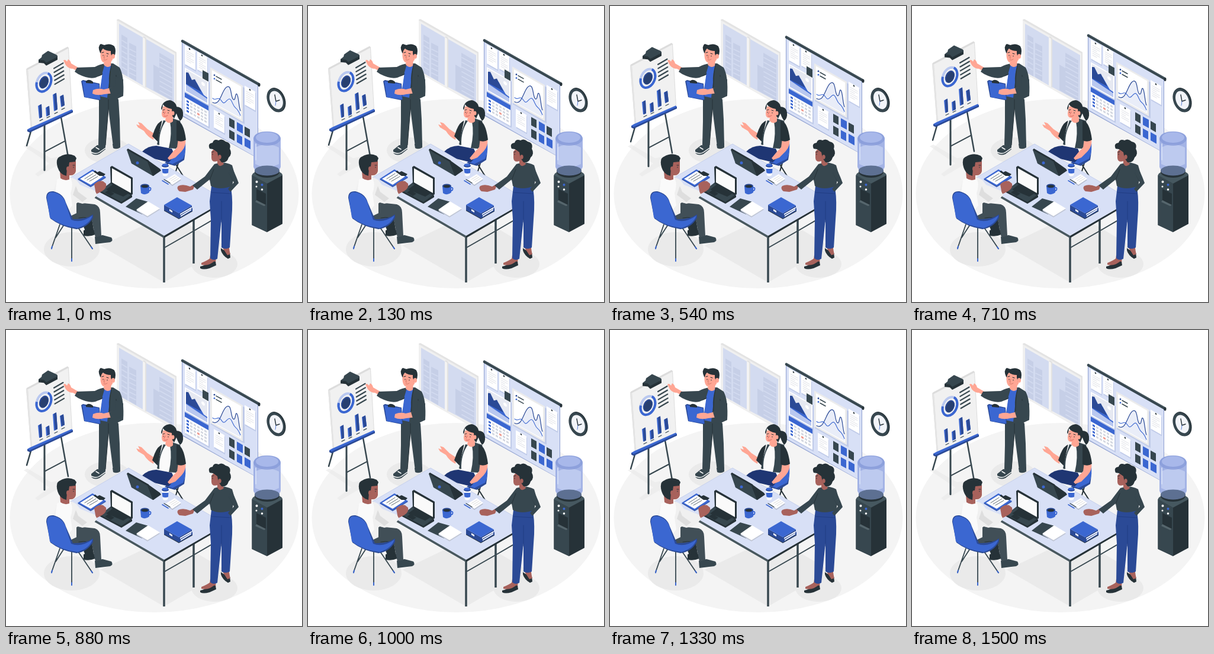
An HTML page for the animation above (1540 ms loop, 500 by 500 pixels).

```html
<!DOCTYPE html>
<html lang="en">
<head>
<meta charset="utf-8">
<title>Team meeting</title>
<style>
html,body{margin:0;width:100%;height:100%;overflow:hidden;background:#fff}
svg{display:block;width:100%;height:100%}
.k{fill:#37474f}.d{fill:#263238}.b{fill:#3b67d1}.n{fill:#2b4a96}.l{fill:#d8e0f6}
.w{fill:#fff}.p{fill:#fafafa}.s{fill:#ffa694}.r{fill:#a8625c}
.ln{fill:none;stroke-linecap:round;stroke-linejoin:round}
.sk{stroke:#37474f}.sd{stroke:#263238}.sb{stroke:#3b67d1}.sn{stroke:#2b4a96}.sg{stroke:#d2d2d2}
</style>
</head>
<body>
<svg viewBox="0 0 500 500">
  <ellipse cx="250.5" cy="317" rx="244" ry="160" fill="#f4f4f4"/>
  <g fill="#eaeaea">
    <ellipse cx="171" cy="244" rx="38" ry="22"/>
    <ellipse cx="111" cy="411" rx="47" ry="29"/>
    <ellipse cx="352" cy="436" rx="39" ry="23"/>
    <path d="M160 405 267 467 372 406 275 350Z"/>
    <path d="M30 237 36 234 76 257 104 252 109 256 54 288 49 284 73 266Z" opacity=".65"/>
  </g>

  <!-- window -->
  <path fill="#e3e3e3" d="M187 23 190 22 288 78V167L285 168 187 112Z"/>
  <path fill="#f0f0f0" d="M187 24 286 80V168L187 112Z"/>
  <path fill="#d3dbf0" d="M191 30 231 53V134L191 111ZM237 56 284 83V162L237 137Z"/>
  <path fill="#c6cfe7" d="M195 48 205 54V119L195 113ZM208 62 220 68V127L208 120ZM259 79 281 92V160L259 148ZM249 99 259 105V148L249 142Z"/>
  <path id="panes" class="ln" stroke="#d3dbf0" stroke-width="1.6"/>
  <path fill="#e2e2e2" d="M231 53 233 51 237 54V138L231 135Z"/>
  <path fill="#f3f3f3" d="M231 53 235 55V137L231 135Z"/>

  <!-- wall board -->
  <g class="float">
    <path fill="#8e9fd0" d="M297 60 426 133V258L297 186Z"/>
    <g transform="matrix(1 .567 0 1 298 60)">
      <rect class="l" y="1" width="127" height="124"/>
      <g fill="#bfcae8">
        <rect x="5" y="6" width="18" height="32"/><rect x="26" y="5" width="17" height="30"/>
        <rect x="5" y="43" width="41" height="78"/><rect x="48" y="19" width="57" height="61"/>
        <rect x="106" y="17" width="18" height="32"/><rect x="54" y="87" width="18" height="30"/>
      </g>
      <g class="w">
        <rect x="4" y="4" width="18" height="32"/><rect x="25" y="3" width="17" height="30"/>
        <rect x="4" y="42" width="40" height="40"/><rect x="4" y="84" width="40" height="35"/>
        <rect x="105" y="15" width="18" height="32"/><rect x="53" y="85" width="18" height="30"/>
      </g>
      <rect x="47" y="17" width="55" height="61" fill="#ececec"/>
      <rect class="w" x="50" y="20" width="49" height="55"/>
      <g id="notes" class="ln" stroke="#d6d9e0" stroke-width=".7"></g>
      <g class="d"><circle cx="12" cy="6" r="1.3"/><circle cx="33" cy="5" r="1.3"/><circle cx="114" cy="17" r="1.3"/><circle cx="62" cy="87" r="1.3"/></g>
      <rect class="k" x="34" y="29" width="10" height="14"/>
      <rect fill="#e6e9f2" x="6" y="44" width="36" height="36"/>
      <path class="b" d="M6 66 17 58 24 56 36 70 42 71V74L6 72Z"/>
      <path class="n" d="M6 68V49L10 47 16 56 21 52 32 67Z"/>
      <path fill="#b9c8f0" d="M6 69 42 73V80H6Z"/><circle class="w" cx="35" cy="52" r="3"/>
      <rect class="b" x="4" y="84" width="40" height="8"/>
      <g id="days"></g>
      <g class="k"><rect x="79" y="84" width="9" height="14"/><rect x="105" y="84" width="9" height="14"/><rect x="79" y="104" width="9" height="14"/></g>
      <g class="b"><rect x="92" y="84" width="10" height="14"/><rect x="92" y="104" width="9" height="14"/><rect x="105" y="103" width="10" height="14"/></g>
    </g>
    <path fill="#e9edf8" d="M349 163C357 168 361 158 365 149S373 134 377 137 380 155 384 158 387 146 390 149 393 170 396 177V189L349 163Z"/>
    <g class="ln">
      <path class="sn" stroke-width="1.2" d="M349 163C357 168 361 158 365 149S373 134 377 137 380 155 384 158 387 146 390 149 393 170 396 177"/>
      <path class="sb" stroke-width="1.1" d="M349 156C354 161 357 154 361 157S366 167 371 162 378 153 383 165 389 168 396 185"/>
      <path class="sk" stroke-width="1.5" d="M355 119 364 124M355 125 364 130"/>
    </g>
    <circle class="n" cx="352" cy="117" r="1.4"/><circle class="b" cx="352" cy="123" r="1.4"/>
    <path class="ln sk" stroke-width="4.6" d="M298 59.500 427 132.500"/>
    <path class="ln" stroke="#52636b" stroke-width=".8" d="M298 57.800 427 130.800"/>
    <ellipse class="d" cx="427.500" cy="133.500" rx="2" ry="3"/>
  </g>

  <!-- clock -->
  <g transform="rotate(-22 456 159)">
    <ellipse class="d" cx="457" cy="159" rx="14.5" ry="21.5"/>
    <ellipse class="k" cx="455.500" cy="159" rx="14" ry="21"/>
    <ellipse cx="456.500" cy="159" rx="10.500" ry="16" fill="#f2f4f9"/>
  </g>
  <path class="ln sd" stroke-width="1.4" d="M454 150 456 161 462 159"/>
  <path class="ln sb" stroke-width=".8" d="M456 161 455 168"/>

  <!-- flip chart -->
  <g class="float">
    <g class="ln sk">
      <path stroke-width="2.5" d="M42 212 35 236M93 188 105 255"/>
      <path stroke-width="2" d="M66 246 100 228"/>
      <path stroke-width="3" d="M65 200V277.500"/>
    </g>
    <path fill="#dcdcdc" d="M34 107 36 105 104 69 106 71 112 176 42 209Z"/>
    <path fill="#f1f1f1" d="M37 108 105 72 111 175 44 207Z"/>
    <path fill="#e4e4e4" d="M34 107 37 108 44 207 42 208Z"/>
    <path class="d" d="M55 91 87 84V91L68 101 64 97 55 96Z"/>
    <path class="k" d="M55 91 60 87 61 83 71 76 86 83 87 86 68 96 64 92Z"/>
    <g transform="rotate(24 64 129)">
      <ellipse cx="64" cy="129" rx="11.500" ry="16.500" fill="none" stroke="#b9c8f0" stroke-width="4"/>
      <path class="ln sb" stroke-width="4" style="stroke-linecap:butt" d="M64 112.500A11.500 16.500 0 1 1 53 134"/>
      <ellipse class="n" cx="64" cy="129" rx="7.500" ry="11"/>
      <ellipse class="d" cx="64.500" cy="129.500" rx="6" ry="9.500" opacity=".4"/>
    </g>
    <path id="bullets" class="ln sk" stroke-width="2.200"/>
    <path class="b" d="M54 169 60 166 61 188 56 190ZM67 172 73 169 74 184 68 187ZM79 150 85 147 87 175 81 178ZM91 153 97 150 99 168 93 171Z"/>
    <path class="n" d="M56 168 60 166 61 188 57 190ZM69 171 73 169 74 184 70 186ZM81 149 85 147 87 175 83 177ZM92 152.500 97 150 99 168 94 170.500Z"/>
    <path class="ln sk" stroke-width="1.200" d="M57 194 62 191.500M69 189 74 186.500M82 182 87 179.500M94 175 99 172.500"/>
    <path class="n" d="M36 209 111 176 113 177V180L40 214 36 212Z"/>
    <path class="b" d="M36 209 41 206 111 175 113 177 40 211Z"/>
  </g>

  <!-- presenter -->
  <path class="k" d="M144 243 154 235 168 236 168 242 158 250Q149 254 144 248ZM180 233 193 232 193 239Q187 243 181 240Z"/>
  <path class="ln" stroke="#fff" stroke-width="1.500" d="M144 247Q152 251 158 247L168 240M152 239 157 242"/>
  <path class="k" d="M157 148 183 148 190 158 192 192 193 235Q188 240 181 237L175 190 173 174 168 236Q162 239 156 235L157 195Z"/>
  <path class="ln sd" stroke-width="1" d="M173 158V174L168 235"/>
  <path class="s" d="M119 109 113 106Q106 106 101 100L97 92Q100 89 103 94L105 90Q109 92 110 97L122 104Z"/>
  <path class="k" d="M169 97Q159 98 150 103L120 104 116 111 122 115Q140 124 151 121L163 116 158 152 185 158 198 152Q200 119 192 104L181 97Z"/>
  <path class="b" d="M167 98 178 99Q173 115 174 129L171 155 157 152Q161 128 163 112Z"/>
  <path class="s" d="M166 93 178 92 177 101Q171 106 165 99Z"/>
  <path class="ln sd" stroke-width="1" d="M178 100Q174 119 175 145M163 115 157 118M186 117 187 137"/>
  <path class="n" d="M127 127 130 125 158 131 160 158 157 159 132 154Z"/>
  <path class="b" d="M129 127 157 132 159 158 133 154Z"/>
  <path class="d" d="M135 127Q140 122 147 128L147 131 135 130Z"/>
  <path class="s" d="M182 137 165 141Q156 138 147 142L146 148Q154 152 166 149L184 147Z"/>
  <path class="k" d="M185 119 198 124 198 143Q190 150 177 149L174 139 184 135Z"/>
  <path class="s" d="M160 74Q168 69 181 76L180 91Q174 99 164 95 158 91 160 74Z"/>
  <path class="d" d="M159 79Q154 68 160 64L166 66Q176 62 183 68 187 75 183 86L179 88 177 80 177 76Q169 76 164 72 161 74 160 80Z"/>
  <ellipse class="s" cx="181" cy="85" rx="3" ry="4"/>
  <path class="ln sd" stroke-width="1.100" d="M162 79 165 78M170 80 173 81M164 83V84M171 84V85"/>
  <path class="ln" stroke="#d57969" stroke-width="1" d="M167 83 165 88 167 88M165 91Q169 92 171 90"/>

  <!-- seated woman -->
  <path class="ln sd" stroke-width="2" d="M284 263 299 287M292 262 287 279M274 265 265 276"/>
  <path class="n" d="M268 265 285 270 301 260Q304 245 302 224L292 215 288 249Z"/>
  <path class="b" d="M302 223Q306 245 299 258L281 267 270 263 289 247 292 218Z"/>
  <path class="s" d="M249 226Q239 221 233 211L223 205 220 200 226 202 223 196 229 198 239 208 251 216Z"/>
  <path class="d" d="M265 193Q256 196 251 209L247 220 256 229 264 222Z"/>
  <path class="p" d="M264 192 285 192 288 240Q270 247 256 237L259 215Z"/>
  <path class="k" d="M282 190 294 194 301 224 287 241 275 240Q281 215 277 195ZM266 193 270 194Q258 211 259 235L255 234 259 214Z"/>
  <path fill="#1f3673" d="M230 246Q240 236 254 236L280 241Q287 253 275 264L250 258Z"/>
  <path class="s" d="M291 224 303 224Q305 236 297 245L286 256 276 260 273 257 282 246 289 239Z"/>
  <path class="d" d="M288 194Q300 194 304 226 297 231 288 227Z"/>
  <path class="d" d="M285 170Q298 169 299 180 300 190 294 194 289 187 287 178Z"/>
  <path class="s" d="M265 170 282 167 286 182 282 187 282 195Q275 201 269 193L270 189Q263 190 263 181Z"/>
  <path class="d" d="M262 173Q264 160 277 159 290 162 289 179L284 190 281 186 280 174Q269 172 265 166 265 171 263 176Z"/>
  <ellipse class="s" cx="282" cy="181" rx="2.500" ry="3.500"/>
  <path class="ln sd" stroke-width="1" d="M265 176 268 175M273 176 276 177M266 179V180M274 180V181"/>
  <path class="ln" stroke="#d46560" stroke-width="1" d="M269 179 267 183M267 186Q271 187 273 185"/>

  <!-- table -->
  <g class="ln sk" style="stroke-linecap:butt">
    <path stroke-width="2" d="M268 408 317 380 346 363M317 380 367 351"/>
    <path stroke-width="3.500" d="M317 360V435M367 333V405"/>
    <path stroke-width="3.500" d="M267 389V467"/>
  </g>
  <path class="d" d="M103 293 267 388 371 328V331L267 392 103 297Z"/>
  <path fill="#495960" d="M103 293 267 388V392L103 297Z"/>
  <path class="l" d="M103 293 207 233 371 328 267 388Z"/>
  <path class="ln" stroke="#c6d0ec" stroke-width="1" d="M103 293 207 233 371 328"/>

  <!-- back laptop -->
  <path class="d" d="M211 264 239 281 249 287 262 278 260 275 239 260Z"/>
  <path class="k" d="M204 243 206 241 241 261 250 286 248 287 212 266Z"/>
  <path class="d" d="M204 243 239 263 248 287 250 286 241 261 206 241Z"/>
  <circle class="b" cx="222" cy="265" r="2.500"/>

  <!-- clipboard -->
  <path class="n" d="M121 293 146 277 169 290 143 306Z"/>
  <path class="b" d="M121 292 146 276 169 289 143 305Z"/>
  <path class="w" d="M125 292 146 279 164 288 143 302Z"/>
  <path class="ln sk" stroke-width=".8" d="M133 292 147 283M137 294 152 285M141 296 155 288"/>
  <path class="d" d="M148 280 151 278 154 281 158 279 168 284 165 287 158 287Z"/>

  <!-- front laptop -->
  <path class="d" d="M159 313 177 299 213 320V323L195 334 159 315Z"/>
  <path class="k" d="M159 312 177 298 213 318 195 331Z"/>
  <path class="d" d="M169 310 181 301 208 316 198 322ZM167 315 173 311 183 317 177 321Z"/>
  <path class="d" d="M176 272 179 270 214 290V318L211 320 177 300Z"/>
  <path class="p" d="M179 274 211 292V316L179 298Z"/>

  <!-- coffee, pad, mug -->
  <path class="w" d="M263 270 275 270 273 286Q269 289 265 286Z"/>
  <path class="b" d="M263.500 275H274.500L274 282Q269 284 264.500 282Z"/>
  <ellipse class="n" cx="269" cy="270" rx="6" ry="2.800"/><ellipse class="b" cx="269" cy="268.500" rx="5" ry="2.300"/>
  <path fill="#b8bfd0" d="M270 295 285 286 296 294 281 304Z"/>
  <path class="w" d="M270 293 285 284 296 292 281 302Z"/>
  <path class="ln sg" stroke-width=".8" d="M276 293 286 287M279 295 289 289M282 297 292 291"/>
  <path class="ln sb" stroke-width="1.600" d="M264 295 274 301"/><path class="ln sk" stroke-width="1.200" d="M267 293 277 299"/>
  <path class="ln sb" stroke-width="2" d="M241 307Q246 306 244 311L240 313"/>
  <path class="b" d="M227 304H242V315Q235 321 228 316Z"/>
  <ellipse class="n" cx="234.500" cy="304" rx="7.500" ry="3.500"/><ellipse class="d" cx="234.500" cy="304.500" rx="5.500" ry="2.300"/>

  <!-- folder and books -->
  <path class="k" d="M202 339 220 325 241 331 230 352Z"/>
  <path fill="#c0c6d5" d="M220 346 240 332 260 344 239 357Z"/>
  <path class="w" d="M220 344 240 330 260 342 239 355Z"/>
  <path class="d" d="M267 346 292 360 315 347V344L292 356 267 342Z"/>
  <path class="n" d="M267 340 292 354 315 341V346L292 359 267 345Z"/>
  <path class="w" d="M295 354 313 343V345L295 356Z"/>
  <path class="n" d="M267 336 292 350 314 337V340L292 355 267 341Z"/>
  <path class="b" d="M267 336 289 323 314 337 292 350Z"/>
  <path class="w" d="M294 351 313 340V342L294 353ZM276 343 281 346V349L276 346Z"/>

  <!-- seated man -->
  <path class="d" d="M131 379 145 374 151 381V386Q142 390 131 388Z"/>
  <path class="k" d="M150 390 163 387 178 391Q182 396 176 399L151 402Z"/>
  <path class="d" d="M120 344 143 348 148 377 134 380 125 358Z"/>
  <path class="r" d="M149 301Q157 294 164 296L169 300Q171 308 162 313L152 318Z"/>
  <path fill="#414f57" d="M105 344 121 332 150 335Q159 338 159 349L161 388 151 391 145 362Q128 371 109 370Z"/>
  <path class="ln sd" stroke-width="1" d="M145 362Q140 355 123 358"/>
  <path fill="#f0f0f0" d="M86 293Q104 284 119 294L125 302 150 312 154 319Q145 332 129 334L119 331 119 350 100 359 78 321Z"/>
  <path class="p" d="M86 293Q98 287 108 290 115 299 109 316L112 337 101 350 82 326Z"/>
  <path fill="#dedede" d="M118 304 122 314 137 325 129 331 113 319Z"/>
  <path class="r" d="M91 278 104 262 118 262 118 279Q116 287 107 286L107 293Q99 296 92 291Z"/>
  <path class="d" d="M87 272Q83 257 92 254 104 247 116 253L119 257 117 263 107 264 106 271 103 275 102 287Q91 285 87 272Z"/>
  <ellipse class="r" cx="105" cy="275" rx="3" ry="4"/>
  <path class="ln sd" stroke-width="1" d="M113 269H116M114 272V273"/>
  <g class="ln sk" stroke-width="1.800"><path d="M91 369 77 409M111 373V430M121 373 146 410M97 371 84 391"/></g>
  <path class="ln sb" stroke-width="2" d="M78 406 77 410M111 427V431M144 407 146 410"/>
  <path class="n" d="M68 324Q68 312 80 313 97 317 101 332L113 360Q134 361 147 352V358Q137 375 119 377 93 373 75 359Z"/>
  <path class="b" d="M69 324Q70 312 82 315 98 319 102 337L110 361Q126 368 146 354 141 369 121 375 91 371 74 357Z"/>

  <!-- water cooler -->
  <path class="d" d="M415.500 286 441 275 467 286V368L441 382 415.500 370Z"/>
  <path class="k" d="M415.500 286 441 300V382L415.500 370Z"/>
  <path fill="#465860" d="M415.500 286Q416 283 420 281L441 272 463 281Q467 283 467 286L441 300Z"/>
  <path class="d" d="M423 309 439 317V337L423 328Z"/>
  <path fill="#56666d" d="M423 328 439 336 436 338 421 331Z"/>
  <circle class="w" cx="423.500" cy="297" r="2"/><circle class="b" cx="432.500" cy="302" r="2"/>
  <circle class="w" cx="423" cy="305" r="1.500"/><circle class="w" cx="432.500" cy="310" r="1.800"/>
  <ellipse class="d" cx="441" cy="280" rx="21" ry="10"/>
  <path fill="#9daee4" fill-opacity=".92" d="M418 224Q420 212 441 212T464 224V272Q458 286 441 286T418 272Z"/>
  <path fill="#c5d0f2" fill-opacity=".8" d="M421 239Q441 229 461 239V267Q441 277 421 267Z"/>
  <ellipse cx="441" cy="224" rx="23" ry="12" fill="#8297d8" fill-opacity=".65"/>
  <ellipse cx="441" cy="222" rx="19" ry="9" fill="#a8b8ea"/>
  <ellipse cx="441" cy="278" rx="21" ry="8.500" fill="#5d7092"/>
  <path class="ln" stroke="#dce4fa" stroke-width="1.500" d="M422 233V260"/>

  <!-- standing woman -->
  <path class="r" d="M345 421 355 422 354 435 343 435ZM365 402 376 402 378 416 370 419Z"/>
  <path class="d" d="M328 440Q338 438 345 430L354 432 355 438 344 443Q333 446 328 443ZM363 409 369 413 378 416 379 425 375 427Q366 422 363 413Z"/>
  <path class="r" d="M330 434Q340 430 345 426L353 430Q343 440 330 437ZM365 407 374 405 379 419 374 421Z"/>
  <path class="n" d="M347 304 379 304Q383 318 382 345L378 408Q371 412 364 408L364 360 357 427Q350 431 345 426L346 360 344 330Z"/>
  <path class="ln" stroke="#213d83" stroke-width="1" d="M364 330V365M347 315 380 317"/>
  <path class="r" d="M320 300 311 305Q299 300 291 304 287 308 293 313L303 314 316 310Z"/>
  <path class="k" d="M352 267Q368 261 382 269L386 283 382 304Q361 312 346 304L344 293 323 310 315 303 336 288Z"/>
  <path class="ln sd" stroke-width="1" d="M351 276 344 294M377 282 384 296"/>
  <path class="k" d="M380 270Q386 280 393 299L379 314 375 309 385 298 376 282Z"/>
  <path class="r" d="M347 246 355 237 367 248 365 261 368 267Q361 274 357 266L357 262Q348 265 347 257Z"/>
  <path class="d" d="M344 241Q340 232 349 231 351 224 359 227 365 223 371 229 381 231 378 241 383 250 376 256 373 266 364 264L359 257 357 247 350 242Z"/>
  <ellipse class="r" cx="361" cy="255" rx="2.700" ry="3.700"/>
  <path class="ln sd" stroke-width="1" d="M348 247 351 246M349 250V251"/>
</svg>
<script>
const $ = id => document.getElementById(id);
const range = (n, f) => Array.from({length: n}, (_, i) => f(i)).join('');

$('panes').setAttribute('d',
  range(8, i => `M260 ${87 + i * 8}l20 11`) + range(6, i => `M196 ${58 + i * 9}l8 5M209 ${73 + i * 8}l10 5`));
$('bullets').setAttribute('d', range(5, i => `M${81 + i * .4} ${105.5 + i * 6.7}l15.5 -9`));

const sheet = (x, y, w, rows) =>
  `<path d="${range(rows, i => `M${x} ${y + i * 3.3}h${i % 3 == 2 ? w * .6 : w}`)}"/>`;
$('notes').innerHTML = sheet(7, 12, 12, 6) + sheet(28, 11, 11, 6) + sheet(108, 23, 12, 6) + sheet(56, 93, 12, 5);
$('days').innerHTML = range(24, i => {
  const fill = i % 6 == 0 ? '#3b67d1' : i == 15 ? '#ef9b90' : '#d3d7e0';
  return `<rect x="${7 + i % 6 * 6}" y="${95 + (i / 6 | 0) * 5.5}" width="4" height="3.2" fill="${fill}"/>`;
});

const LOOP = 1540, LIFT = 10;
const floats = document.querySelectorAll('.float');

function draw(ms) {
  const phase = (ms + 30) % LOOP / (LOOP / 2);
  const rise = Math.pow(1 - Math.abs(phase - 1), 1.3);
  floats.forEach(g => g.setAttribute('transform', `translate(0 ${(-LIFT * rise).toFixed(2)})`));
}

const start = performance.now();
function tick() {
  draw(performance.now() - start);
  requestAnimationFrame(tick);
}
draw(0);
requestAnimationFrame(tick);
</script>
</body>
</html>
```
